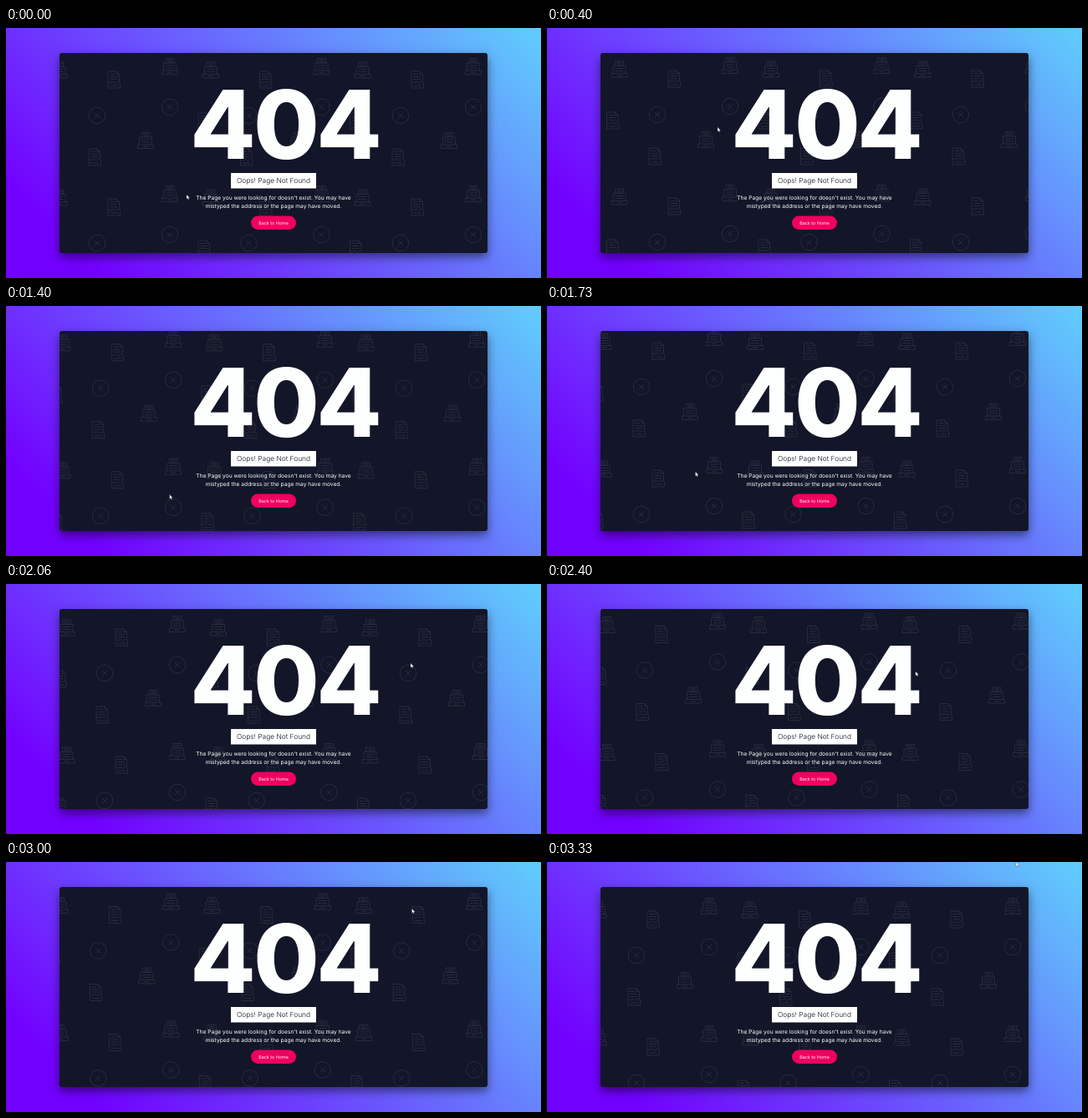
An HTML page for the animation above (5.2 s loop, 640 px wide and 300 px high).

```html
<!DOCTYPE html>
<html lang="en">
<head>
<meta charset="utf-8">
<title>404</title>
<style>
  html, body { margin: 0; width: 100%; height: 100%; overflow: hidden; }
  body { background: linear-gradient(45deg, #7200ff 12%, #60cafc 98%); }
  .stage { position: absolute; left: 0; top: 0; width: 640px; height: 300px; overflow: hidden; }
  .card {
    position: absolute; left: 64px; top: 30px; width: 512px; height: 240px;
    border-radius: 3px; background: #131628; box-shadow: 0 5px 12px rgba(0, 0, 0, .5);
  }
  svg { position: absolute; left: 0; top: 0; }
  text {
    font-family: Inter, "Open Sans", sans-serif; fill: #fdfffe;
    text-anchor: middle; text-rendering: geometricPrecision;
  }
  .code { font-size: 114px; font-weight: 800; }
  .title { font-size: 8.4px; font-weight: 300; fill: #131628; }
  .note { font-size: 6.65px; font-weight: 400; }
  .label { font-size: 5.4px; font-weight: 400; }
  .icons { fill: none; stroke: #2f3243; stroke-width: .75; stroke-linejoin: round; }
</style>
</head>
<body>
<div class="stage">
  <div class="card"></div>
  <svg width="640" height="300" viewBox="0 0 640 300">
    <defs>
      <clipPath id="inside"><rect x="64" y="30" width="512" height="240" rx="3"/></clipPath>
      <g id="cross">
        <circle r="9.8"/>
        <path d="M-3-3L3 3M3-3L-3 3"/>
      </g>
      <g id="doc">
        <path d="M-7 2V-10H3L6.500-6.500V2M3-10V-6.500H6.500"/>
        <path d="M-4.500-6.500H1M-4.500-3.500H4M-4.500-.5H4"/>
        <path d="M-7 2L-4 4L-1 2L2 4L5 2L7.500 4V10H-7ZM-4.500 7H5"/>
      </g>
      <g id="printer">
        <path d="M-5-4V-9.500H5V-4M-3-7.500H3M-3-5.500H3"/>
        <path d="M-7.500 5V-4H7.500V5M-5-1H5M-5 2H5"/>
        <path d="M-9.500 5H9.500V9.500H-9.500ZM-3 7.200H3"/>
      </g>
    </defs>
    <g clip-path="url(#inside)"><g class="icons" id="icons"></g></g>

    <text class="code" x="259.5 335.5 410.5" y="157">404</text>
    <rect x="269" y="174" width="102" height="18.500" fill="#fdfffe"/>
    <text class="title" x="320" y="186.3">Oops! Page Not Found</text>
    <text class="note" x="320" y="206">The Page you were looking for doesn't exist. You may have</text>
    <text class="note" x="320" y="215.7">mistyped the address or the page may have moved.</text>
    <rect x="293" y="225.500" width="54" height="16.500" rx="8.25" fill="#f0005f"/>
    <text class="label" x="320" y="235.8">Back to Home</text>

    <path id="cursor" d="M0 0V5.200L1.200 4.200L2.100 6L3 5.600L2.200 3.900L3.700 3.700Z"
      fill="#fff" stroke="#22243a" stroke-width=".3"/>
  </svg>
</div>
<script>
  const LOOP = 5200, LAST = 50;
  const TILE_W = 181.5, TILE_H = 153;

  // One tile of icons, placed relative to its first cross.
  const tile = [
    ['cross', 0, 0], ['cross', 87, -10],
    ['doc', 20, -43], ['doc', -3, 50], ['doc', 128, 7],
    ['printer', 87, -59], ['printer', 136, -54.5], ['printer', 58, 30]
  ];

  // step, icon offset x and y, cursor x and y
  const keys = [
    [0, 109, 105, 216, 200],
    [6, 132, 104, 204, 119],
    [15, 116, 102, 219.5, 232.5],
    [26, 113, 97, 177.5, 199],
    [31, 118, 107, 484, 95],
    [40, 115, 101, 410, 112],
    [50, 107, 112, 561, 0]
  ];
  const held = new Set([2, 17, 20, 32]);

  const icons = document.getElementById('icons');
  const cursor = document.getElementById('cursor');

  for (let row = -1; row < 3; row++) {
    for (let col = -2; col < 4; col++) {
      for (const [name, x, y] of tile) {
        const use = document.createElementNS('http://www.w3.org/2000/svg', 'use');
        use.setAttribute('href', '#' + name);
        use.setAttribute('x', x + col * TILE_W);
        use.setAttribute('y', y + row * TILE_H);
        icons.append(use);
      }
    }
  }

  const startOf = n => Math.floor(n * 20 / 3) * 10;

  function stepAt(t) {
    let n = LAST;
    while (startOf(n) > t) n--;
    return held.has(n) ? n - 1 : n;
  }

  function slope(i, c) {
    if (i === 0 || i === keys.length - 1) return 0;
    const a = keys[i - 1], b = keys[i + 1], k = keys[i];
    if ((k[c] - a[c]) * (b[c] - k[c]) <= 0) return 0;
    return (b[c] - a[c]) / (b[0] - a[0]);
  }

  function valueAt(n, c) {
    let i = 0;
    while (i < keys.length - 2 && n >= keys[i + 1][0]) i++;
    const a = keys[i], b = keys[i + 1];
    const span = b[0] - a[0], u = (n - a[0]) / span;
    const u2 = u * u, u3 = u2 * u;
    return (2 * u3 - 3 * u2 + 1) * a[c] + (3 * u2 - 2 * u3) * b[c]
      + span * ((u3 - 2 * u2 + u) * slope(i, c) + (u3 - u2) * slope(i + 1, c));
  }

  const move = (el, x, y) => el.setAttribute('transform', `translate(${x.toFixed(2)} ${y.toFixed(2)})`);

  function draw(t) {
    const n = stepAt(t);
    move(icons, valueAt(n, 1), valueAt(n, 2));
    move(cursor, valueAt(n, 3), valueAt(n, 4));
    // The arrow gives way to a text caret over the big digits.
    cursor.style.visibility = n >= 37 && n <= 42 ? 'hidden' : 'visible';
  }

  const begin = performance.now();
  function tick() {
    draw((performance.now() - begin) % LOOP);
    requestAnimationFrame(tick);
  }
  draw(0);
  requestAnimationFrame(tick);
</script>
</body>
</html>
```
